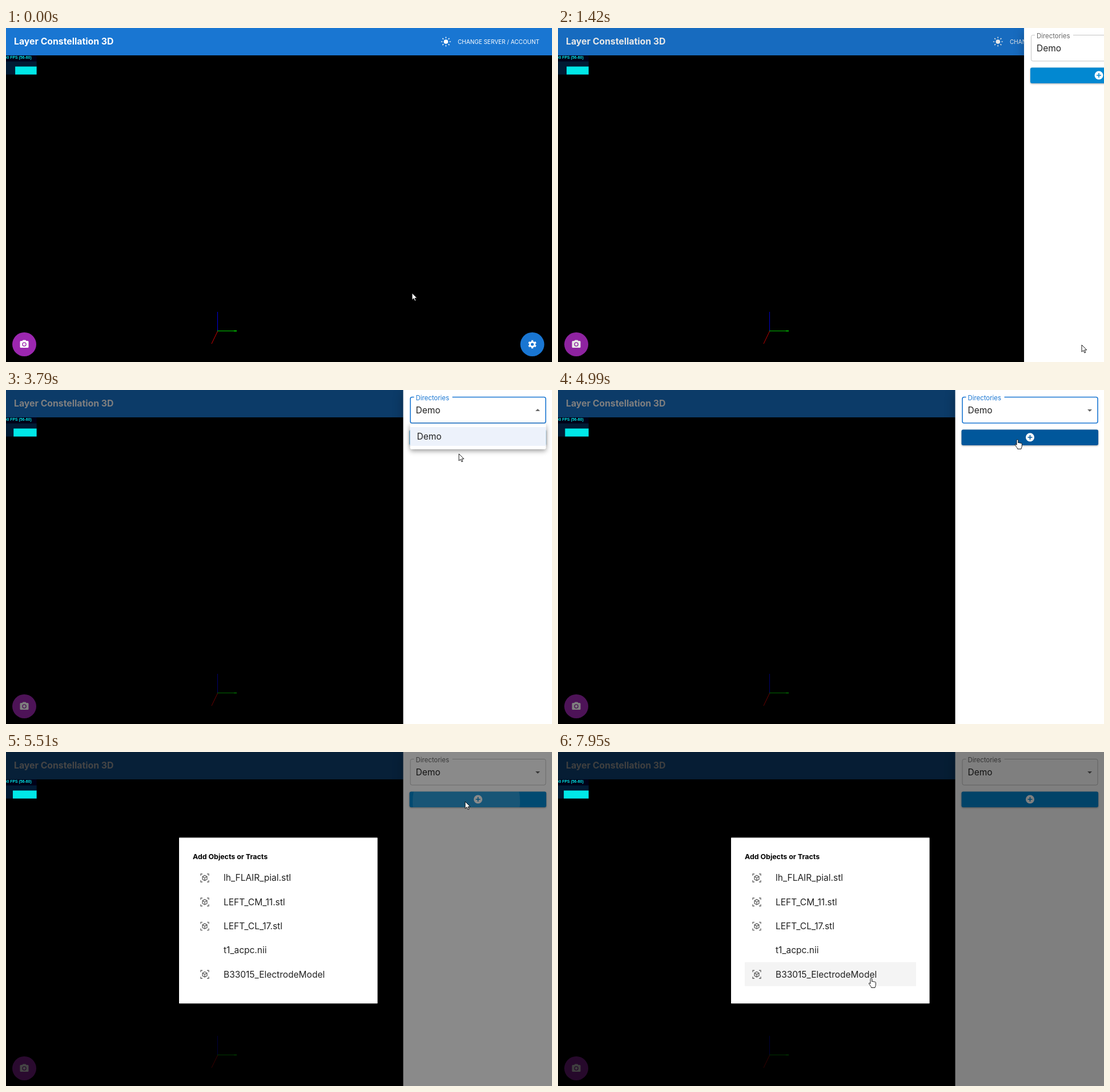
An HTML page for the animation above (8 s loop, 956 px wide and 586 px high).

```html
<!DOCTYPE html>
<html lang="en">
<head>
<meta charset="utf-8">
<title>3D viewer</title>
<style>
  html, body { margin: 0; width: 100%; height: 100%; overflow: hidden; background: #000; }
  svg { display: block; width: 100vw; height: 100vh; }
  text { font-family: Inter, "Open Sans", sans-serif; font-size: 15.5px; fill: #212121; }
  .bold { font-weight: 700; }
  .line { fill: none; stroke-width: 1; }
  #sheet { filter: drop-shadow(0 6px 9px rgba(0,0,0,.3)); }
  #button { filter: drop-shadow(0 1.5px 1.5px rgba(0,0,0,.35)); }
  #menu { filter: drop-shadow(0 3px 4px rgba(0,0,0,.4)); }
</style>
</head>
<body>
<svg viewBox="0 0 956 586" preserveAspectRatio="none">
  <defs>
    <clipPath id="buttonClip"><rect x="706.5" y="69.5" width="239.5" height="27.5" rx="3"/></clipPath>
    <g id="cube" class="line" stroke="#686868" style="stroke-width:1.35">
      <path d="M-7-4V-7H-4M4-7H7V-4M7 4V7H4M-4 7H-7V4"/>
      <path d="M0-4.7L4-2.4V2.4L0 4.7L-4 2.4V-2.4ZM-4-2.4L0 0L4-2.4M0 0V4.7"/>
    </g>
  </defs>
  <rect width="956" height="586"/>

  <!-- app bar -->
  <rect width="956" height="48" fill="#1976d2"/>
  <text class="bold" x="14" y="29" style="font-size:15.8px;fill:#fff">Layer Constellation 3D</text>
  <g transform="translate(770.3 24)">
    <circle r="3.8" fill="#fff"/>
    <circle r="7.2" fill="none" stroke="#fff" stroke-width="2.4" pathLength="8" stroke-dasharray=".26 .74" stroke-dashoffset=".13"/>
  </g>
  <text x="791" y="27.7" style="font-size:10px;fill:#fff">CHANGE SERVER / ACCOUNT</text>

  <!-- axes -->
  <g class="line">
    <path d="M370.5 532V498" stroke="#0000dc"/>
    <path d="M370.5 532L360 554" stroke="#d00000"/>
    <path d="M370 531.5H404" stroke="#00d000"/>
    <path d="M399 531.5H404" stroke="#00e000" stroke-width="1.6"/>
  </g>

  <!-- round buttons -->
  <g transform="translate(32 555)">
    <circle r="21" fill="#9c27b0"/>
    <path transform="scale(.75) translate(-12 -12)" fill="#fff" fill-rule="evenodd"
      d="M9 2 7.2 4H4a2 2 0 0 0-2 2V18a2 2 0 0 0 2 2H20a2 2 0 0 0 2-2V6a2 2 0 0 0-2-2H16.8L15 2ZM12 17a5 5 0 1 1 0-10a5 5 0 1 1 0 10Z"/>
    <circle r="2.4" fill="#fff"/>
  </g>
  <g transform="translate(921.5 555)">
    <circle r="21" fill="#1976d2"/>
    <g fill="none" stroke="#fff">
      <circle r="4.1" stroke-width="3"/>
      <circle r="6.2" stroke-width="2.3" pathLength="12" stroke-dasharray="1 1" stroke-dashoffset="-.5"/>
    </g>
  </g>

  <rect id="shade" width="956" height="586"/>

  <!-- drawer -->
  <g id="drawer">
    <rect id="sheet" x="695.5" width="262" height="586" fill="#fff"/>
    <path id="border" class="line" d="M714.5 12.5H711a3 3 0 0 0-3 3V55a3 3 0 0 0 3 3H942a3 3 0 0 0 3-3V15.5a3 3 0 0 0-3-3H781.5"/>
    <text id="label" x="717.5" y="17.5" style="font-size:11.4px">Directories</text>
    <text x="717.5" y="41">Demo</text>
    <path id="caret" d="M-4-2H4L0 2Z" fill="#666"/>
    <rect id="button" x="706.5" y="69.5" width="239.5" height="27.5" rx="3"/>
    <circle id="ripple" cx="806" cy="87" fill="#fff" clip-path="url(#buttonClip)"/>
    <circle cx="826.5" cy="83" r="7.5" fill="#fff"/>
    <path id="plus" class="line" d="M822.5 83H830.5M826.5 79V87" style="stroke-width:1.6"/>
  </g>
  <g id="menu">
    <rect x="707.5" y="59" width="238" height="45" rx="3" fill="#fff"/>
    <rect x="707.5" y="65" width="238" height="33" fill="#edf2fb"/>
    <text x="719.5" y="86.5">Demo</text>
  </g>

  <!-- dialog -->
  <rect id="dialogShade" width="956" height="586"/>
  <g id="dialog">
    <rect x="303" y="149" width="347.5" height="293.5" rx="2" fill="#333"/>
    <rect x="303" y="150.5" width="347.5" height="290.5" fill="#fff"/>
    <rect id="rowHover" x="327" width="300" height="42" fill="#f4f4f4"/>
    <text class="bold" x="327" y="188" style="font-size:12.4px;fill:#000">Add Objects or Tracts</text>
    <g id="rows"></g>
  </g>

  <!-- frame rate panel -->
  <g transform="translate(-.4 -.4)">
    <rect x="-1" y="48.4" width="55" height="33.6" fill="#000018"/>
    <rect x="-1" y="59" width="55" height="23" fill="#001a33"/>
    <rect id="rate" y="68" height="14" fill="#00e8e8"/>
    <text class="bold" x="-2" y="54.6" style="font:bold 6.9px 'Liberation Sans',sans-serif;fill:#00e8e8">60 FPS (56-60)</text>
  </g>

  <path id="cursor" fill="#fff" stroke="#000" stroke-width=".9" stroke-linejoin="round"/>
</svg>
<script>
const LOOP = 8000;
const ROW_TOP = 200, ROW_STEP = 42.3;
const DRAWER_START = 1369.4, DIALOG_START = 5360, FADE = 225;
const ARROW = 'M0 0V12.2L2.9 9.6L4.9 14L6.8 13.2L4.9 8.9H8.8Z';
const HAND = 'M-1 9.5V1.5a1.4 1.4 0 0 1 2.8 0V6a1.2 1.2 0 0 1 2.3 .3a1.2 1.2 0 0 1 2.2 .5a1.1 1.1 0 0 1 2 .7V11c0 2.5-1.1 3.3-1.3 5.5H.6C.4 14.2-1.8 12.6-3.3 9.9c-.9-1.8 .9-2.4 2.3-.4Z';

// The picture refreshes in bursts: first time, last time, number of refreshes.
const BURSTS = [
  [120, 1020, 8], [1170, 1420, 3], [1570, 2200, 6], [2320, 2470, 2], [2780, 3350, 5],
  [3790, 4690, 8], [4840, 4990, 2], [5390, 5510, 2], [5660, 6320, 6], [6440, 7250, 7], [7530, 7950, 4]
];
// Pointer path: time, x, y.
const PATH = [
  [0, 711, 465], [1020, 917, 556], [1420, 917, 556], [2200, 798, 91], [2470, 794, 46],
  [2780, 794, 46], [3350, 794, 90], [3790, 793, 112], [4100, 795, 131], [4250, 795, 131],
  [4690, 803, 101], [4990, 804, 87], [5510, 804, 87], [6320, 546, 394], [7530, 546, 395], [7950, 548, 397]
];

const $ = id => document.getElementById(id);
const clamp = v => Math.max(0, Math.min(1, v));
const set = (id, attrs) => { for (const k in attrs) $(id).setAttribute(k, attrs[k]); };

function bezier(x1, y1, x2, y2) {
  const curve = (a, b, s) => 3 * (1 - s) ** 2 * s * a + 3 * (1 - s) * s * s * b + s ** 3;
  return x => {
    let low = 0, high = 1;
    for (let i = 0; i < 24; i++) {
      const mid = (low + high) / 2;
      if (curve(x1, x2, mid) < x) low = mid; else high = mid;
    }
    return curve(y1, y2, low);
  };
}
const easeOut = bezier(0, 0, .2, 1);
const easeInOut = bezier(.4, 0, .2, 1);
const progress = (t, start, length, ease = easeInOut) => ease(clamp((t - start) / length));

function lastRefresh(t) {
  let shown = 0;
  for (const [first, last, count] of BURSTS)
    for (let i = 0; i < count; i++) {
      const time = first + (last - first) * i / (count - 1);
      if (time <= t) shown = time;
    }
  return shown;
}

function pointerAt(t) {
  const i = PATH.findIndex(p => p[0] > t);
  if (i < 0) return PATH[PATH.length - 1].slice(1);
  const [t0, x0, y0] = PATH[i - 1], [t1, x1, y1] = PATH[i];
  let k = (t - t0) / (t1 - t0);
  k = k * k * (3 - 2 * k);
  return [x0 + (x1 - x0) * k, y0 + (y1 - y0) * k];
}

$('rows').innerHTML = ['lh_FLAIR_pial.stl', 'LEFT_CM_11.stl', 'LEFT_CL_17.stl', 't1_acpc.nii', 'B33015_ElectrodeModel']
  .map((name, i) => {
    const y = ROW_TOP + 21 + i * ROW_STEP;
    const icon = name.endsWith('.nii') ? '' : `<use href="#cube" x="348" y="${y}"/>`;
    return `${icon}<text x="381" y="${y + 5.3}">${name}</text>`;
  }).join('');

function draw(t) {
  const [x, y] = pointerAt(t);
  const within = (left, top, right, bottom) => x >= left && x <= right && y >= top && y <= bottom;
  const menuOpen = t >= 2780 && t < 4150;
  const focused = t >= 2780 && t < 5390;
  const modal = t >= 5390;
  const drawerReady = t >= 1570 && !menuOpen && !modal;
  const overField = drawerReady && within(708, 12, 945, 58);
  const overButton = drawerReady && within(707, 69, 946, 97);
  const overItem = menuOpen && within(708, 65, 945, 98);
  const overGear = t < 1300 && Math.hypot(x - 921.5, y - 555) < 21;
  const row = Math.floor((y - ROW_TOP) / ROW_STEP);
  const overRow = t >= 5660 && within(327, ROW_TOP, 627, 411) && row < 5;

  set('shade', { opacity: .5 * progress(t, DRAWER_START, FADE) });
  set('drawer', { transform: `translate(${262 * (1 - progress(t, DRAWER_START, FADE, easeOut))})`,
    visibility: t < DRAWER_START ? 'hidden' : 'visible' });

  set('border', { stroke: focused ? '#1976d2' : overField ? '#212121' : '#c4c4c4',
    style: `stroke-width:${focused ? 1.6 : 1}` });
  $('label').style.fill = focused ? '#1976d2' : '#666';
  set('caret', { transform: `translate(931 ${menuOpen ? 35 : 36})${menuOpen ? ' scale(1 -1)' : ''}` });
  const buttonColor = overButton ? '#01579b' : '#0288d1';
  set('button', { fill: buttonColor });
  set('plus', { stroke: buttonColor });
  set('ripple', { r: clamp((t - 5390) / 120) * 94, opacity: modal && t < 5660 ? .17 : 0 });

  const grow = progress(t, 2755, 240);
  set('menu', { opacity: grow * (1 - progress(t, 4130, 200)),
    transform: `translate(826.5 59) scale(${.75 + .25 * grow} ${.5625 + .4375 * grow}) translate(-826.5 -59)` });

  const fade = progress(t, DIALOG_START, FADE);
  set('dialogShade', { opacity: .5 * fade });
  set('dialog', { opacity: clamp(fade * 1.3) });
  set('rowHover', { y: ROW_TOP - .5 + row * ROW_STEP, visibility: overRow ? 'visible' : 'hidden' });

  const rateLeft = 16.5 - t * .00075;
  set('rate', { x: rateLeft, width: 54 - rateLeft });

  const hand = overField || overButton || overItem || overGear || overRow;
  set('cursor', { d: hand ? HAND : ARROW, transform: `translate(${x} ${y})` });
}

function tick() {
  draw(lastRefresh(performance.now() % LOOP));
  requestAnimationFrame(tick);
}
tick();
</script>
</body>
</html>
```
